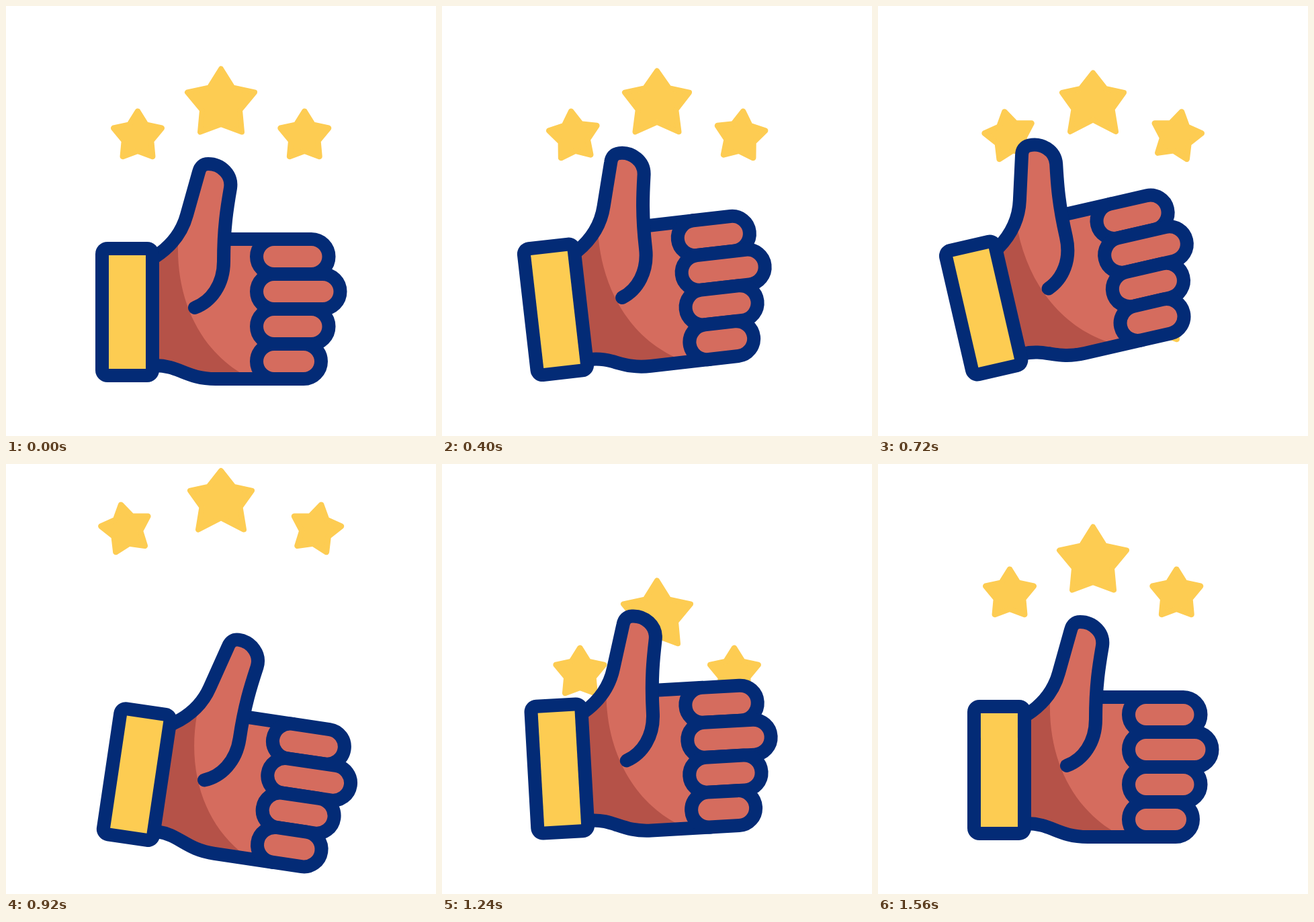
These frames come from a looping animation (640x640 px, 2000 ms). An HTML page:

```html
<!DOCTYPE html>
<html lang="en">
<head>
<meta charset="utf-8">
<title>Thumbs up</title>
<style>
  html, body { margin: 0; width: 100%; height: 100%; overflow: hidden; background: #fff; }
  svg { display: block; width: 100vw; height: 100vh; }
  .star { fill: #fdcc52; stroke: #fdcc52; stroke-linejoin: round; }
  .skin { fill: #d56c5e; }
  .line { fill: none; stroke: #032b76; stroke-width: 20; stroke-linecap: round; stroke-linejoin: round; }
  .finger { fill: #d56c5e; stroke: #032b76; stroke-width: 20; }
</style>
</head>
<body>
<svg viewBox="0 0 640 640">
  <g id="stars"></g>
  <g id="hand">
    <path class="skin" d="M222 373C245 358 262 337 269 311L286 247Q289 235 300 235C320 235 337 251 334 271C330 297 326 320 325 347H400V555H312C268 555 258 535 222 535Z"/>
    <path fill="#b55248" d="M256 343V355C254 440 290 510 349 546V555H312C268 555 258 535 222 535V373Q242 360 256 343Z"/>
    <path class="line" d="M326 347H400M222 535C258 535 268 555 312 555H400"/>
    <path class="line" d="M222 373C245 358 262 337 269 311L287 247Q290 235 301 235C320 235 337 251 334 271C329 300 324 330 324 380C324 415 305 440 281 449"/>
    <g id="fingers"></g>
    <rect x="133" y="351" width="95" height="209" rx="18" fill="#032b76"/>
    <rect x="153" y="371" width="55" height="169" fill="#fdcc52"/>
  </g>
</svg>
<script>
const LOOP = 2000;
const $ = id => document.getElementById(id);

function add(parent, tag, attrs) {
  const el = document.createElementNS('http://www.w3.org/2000/svg', tag);
  for (const k in attrs) el.setAttribute(k, attrs[k]);
  return parent.appendChild(el);
}

[480.5, 497.5, 480.5, 469].forEach((right, i) =>
  add($('fingers'), 'rect', {
    class: 'finger', x: 373, y: 347 + 52 * i, width: right - 373, height: 52, rx: 26
  }));

const lerp = (a, b, k) => a + (b - a) * k;
const part = (t, a, b) => Math.min(1, Math.max(0, (t - a) / (b - a)));
const smooth = u => u * u * (3 - 2 * u);
const ease = (t, a, b) => smooth(part(t, a, b));
// Softer ease, halfway to linear
const glide = (t, a, b) => (part(t, a, b) + ease(t, a, b)) / 2;

// Right half of a star, from the top tip to the bottom notch
const REST = [[0, -51.5], [17.5, -23.5], [50, -16.5], [28, 10], [31, 42.5], [0, 31]];
const TILT = [[0, -45.5], [18.5, -22], [46, -16], [28.5, 8.5], [34, 42], [0, 24.5]];

function starPoints(k) {
  const half = REST.map((p, i) => [lerp(p[0], TILT[i][0], k), lerp(p[1], TILT[i][1], k)]);
  const mirror = half.slice(1, 5).reverse().map(([x, y]) => [-x, y]);
  return half.concat(mirror).join(' ');
}

const SMALL = 0.715;
const spots = [
  { x: 196, y: 193.5, side: -1 },
  { x: 320, y: 145, side: 0 },
  { x: 444.3, y: 193.5, side: 1 }
];

for (const s of spots) {
  const attrs = { class: 'star', points: starPoints(0), 'stroke-width': s.side ? 12 : 8 };
  s.leaving = add($('stars'), 'polygon', attrs);
  s.rising = add($('stars'), 'polygon', attrs);
}

function place(el, s, dx, dy, turn) {
  const size = s.side ? SMALL : 1;
  el.setAttribute('transform',
    `translate(${s.x + dx} ${s.y + dy}) rotate(${turn}) scale(${size})`);
}

const swing = [[80, 0], [720, -13], [860, 10], [1100, 0], [1334, -5], [1566, 0]];

function handAngle(t) {
  let angle = 0;
  for (let i = 1; i < swing.length; i++) {
    const [a, from] = swing[i - 1], [b, to] = swing[i];
    angle += (to - from) * ease(t, a, b);
  }
  return angle;
}

function draw(t) {
  $('hand').setAttribute('transform', `rotate(${handAngle(t)} 142.5 555)`);
  const wind = ease(t, 80, 720);
  const leave = ease(t, 720, 1220);

  for (const s of spots) {
    const up = (s.side ? 275 : 254) * leave;
    const low = 272 * (1 - (s.side ? glide(t, 840, 1560) : glide(t, 850, 1433)));
    place(s.leaving, s, s.side * 0.178 * up, -up, 12 * s.side * wind);
    place(s.rising, s, -s.side * 0.08 * low, low, 0);
    if (!s.side) s.leaving.setAttribute('points', starPoints(wind));
  }
}

let start;
function tick(now) {
  if (start === undefined) start = now;
  draw((now - start) % LOOP);
  requestAnimationFrame(tick);
}
draw(0);
requestAnimationFrame(tick);
</script>
</body>
</html>
```
